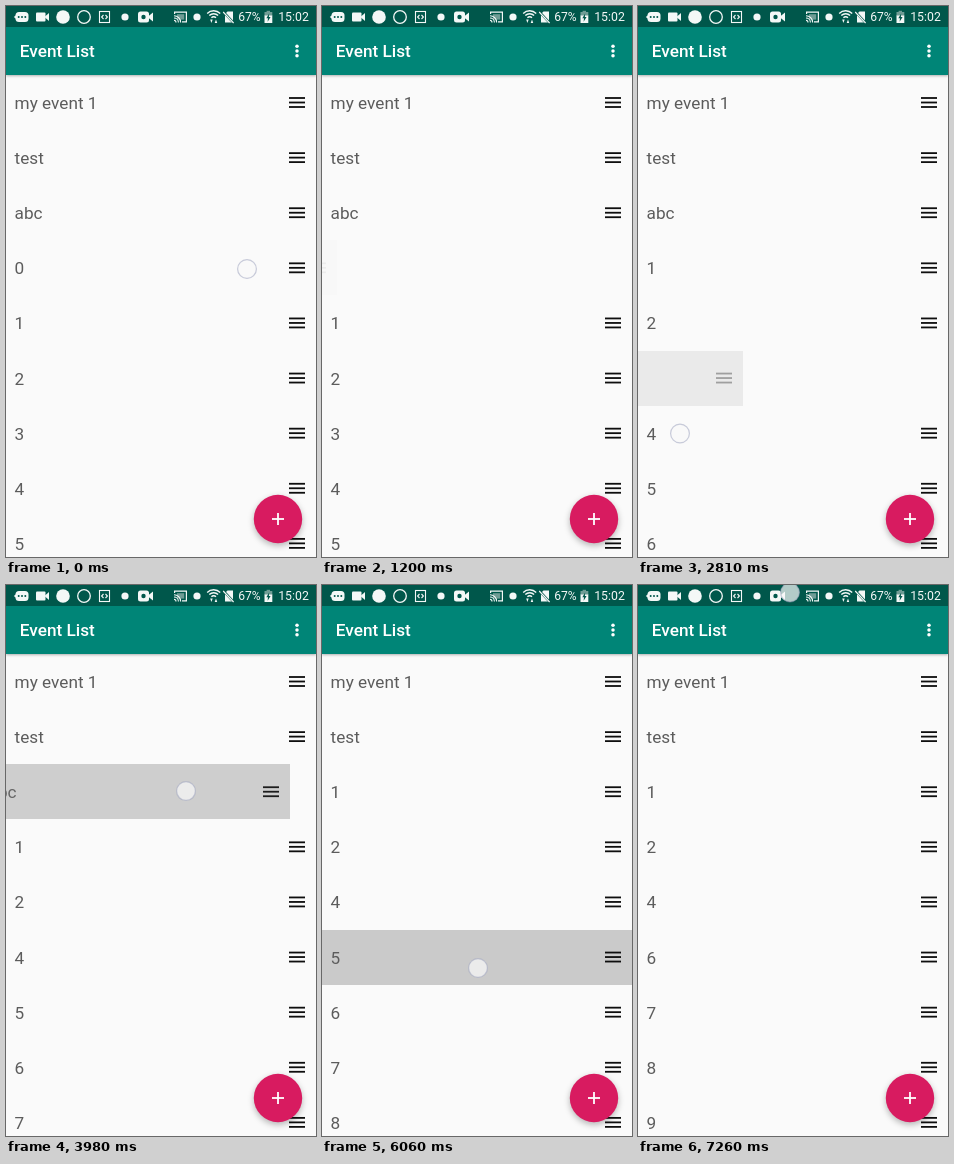
An HTML page with a canvas that plays this animation: 310 px wide and 551 px high, repeating every 8 s.

```html
<!DOCTYPE html>
<html>
<head>
<meta charset="utf-8">
<style>
html, body { margin: 0; width: 100%; height: 100%; overflow: hidden; background: #fafafa; }
canvas { display: block; width: 310px; height: 551px; }
</style>
</head>
<body>
<canvas id="stage"></canvas>
<script>
const W = 310, H = 551, LOOP = 8000, STEP = 100, ROW = 55.11, TOP = 69;
const canvas = document.getElementById('stage');
const ctx = canvas.getContext('2d');
const dpr = window.devicePixelRatio || 1;
canvas.width = W * dpr;
canvas.height = H * dpr;

const labels = ['my event 1', 'test', 'abc', ...Array.from({ length: 13 }, (_, i) => String(i))];

// touch: when the finger lands; drag: offsets per step; close: how far the gap has shut per step
const swipes = [
  { row: 3, touch: 0, start: 500, x: 241, y: 263, slip: 8, slope: .173,
    drag: [0, 14, 44, 81, 125, 180, 245, 295], lift: 6, shift: 1600, close: [.15, .7, 1] },
  { row: 5, touch: 1800, start: 2510, x: 247, y: 385.5, slip: 0, slope: .205,
    drag: [0, 45, 122, 205, 280], lift: 4, shift: 3210, close: [.15, .7, 1] },
  { row: 2, touch: 3410, start: 3880, x: 208, y: 211, slip: 2, slope: -.19,
    drag: [0, 26, 88, 170, 255], lift: 4, shift: 4580, close: [.1, .5, .95, 1] },
  { row: 5, touch: 4880, start: 6060, x: 156, y: 383, slip: 0, slope: .1,
    drag: [0, 10, 30, 60, 105, 165, 250], lift: 6, shift: 6960, close: [.1, .5, .95, 1] }
];
const LAST_TOUCH = 7260;

function rect(x, y, w, h, color) {
  ctx.fillStyle = color;
  ctx.fillRect(x, y, w, h);
}

function disc(x, y, r, color) {
  ctx.fillStyle = color;
  ctx.beginPath();
  ctx.arc(x, y, r, 0, Math.PI * 2);
  ctx.fill();
}

function arc(x, y, r, color, width, from = 0, to = Math.PI * 2) {
  ctx.strokeStyle = color;
  ctx.lineWidth = width;
  ctx.beginPath();
  ctx.arc(x, y, r, from, to);
  ctx.stroke();
}

function poly(points, color) {
  ctx.fillStyle = color;
  ctx.beginPath();
  points.forEach(([x, y]) => ctx.lineTo(x, y));
  ctx.fill();
}

function line(points, color, width) {
  ctx.strokeStyle = color;
  ctx.lineWidth = width;
  ctx.beginPath();
  points.forEach(([x, y]) => ctx.lineTo(x, y));
  ctx.stroke();
}

function box(x, y, w, h, r, color) {
  ctx.fillStyle = color;
  ctx.beginPath();
  ctx.roundRect(x, y, w, h, r);
  ctx.fill();
}

function text(str, x, y, size, color, weight = 400) {
  ctx.font = `${weight} ${size}px Roboto, sans-serif`;
  ctx.fillStyle = color;
  ctx.fillText(str, x, y);
}

function shadow(color, blur, dy) {
  ctx.shadowColor = color;
  ctx.shadowBlur = blur * dpr;
  ctx.shadowOffsetY = dy * dpr;
}

function drawRow(label, y, offset = null) {
  ctx.save();
  if (offset !== null) {
    ctx.translate(-offset, 0);
    ctx.globalAlpha = Math.max(0, 1 - offset / W);
    rect(0, Math.round(y), W, 55, '#cacaca');
  }
  text(label, 8.6, y + 34, 17.2, '#5c5c5c');
  for (const dy of [-4.5, 0, 4.5]) rect(283, y + 26.6 + dy, 16, 1.8, '#0e0e0e');
  ctx.restore();
}

function drawList(t) {
  const items = labels.slice();
  let gap = null;
  let held = null;
  for (const s of swipes) {
    if (t < s.start) break;
    const i = Math.floor((t - s.start) / STEP);
    if (i < s.drag.length) {
      held = { row: s.row, offset: s.drag[i] };
      gap = null;
      break;
    }
    items.splice(s.row, 1);
    const k = Math.floor((t - s.shift) / STEP);
    const closed = k < 0 ? 0 : s.close[Math.min(k, s.close.length - 1)];
    gap = { row: s.row, size: ROW * (1 - closed) };
  }
  items.forEach((label, i) => {
    const y = TOP + i * ROW + (gap && i >= gap.row ? gap.size : 0);
    if (y < H) drawRow(label, y, held && held.row === i ? held.offset : null);
  });
}

function drawFab() {
  ctx.save();
  shadow('rgba(0,0,0,.28)', 6, 2.5);
  disc(272, 513, 24.2, '#d81b60');
  ctx.restore();
  rect(266, 512.1, 12, 1.8, '#fff');
  rect(271.1, 507, 1.8, 12, '#fff');
}

function drawStatusIcons() {
  const white = '#f4f8f7', dark = '#00574b', dim = '#6f9c95';
  // message
  box(9.5, 6, 13, 10, 3.5, white);
  poly([[11, 8.5], [7.8, 11], [11, 13.5]], white);
  for (const x of [12.7, 16, 19.3]) disc(x, 11, 1, dark);
  // camcorder
  box(30, 6.5, 9.5, 9, 1, white);
  poly([[39, 10.5], [43, 7], [43, 15], [39, 11.5]], white);
  // app marks
  disc(57, 11, 6.8, white);
  arc(78, 11, 6.3, white, 1.3);
  // code box
  ctx.strokeStyle = white;
  ctx.lineWidth = 1.1;
  ctx.strokeRect(93.5, 5.5, 10, 11);
  line([[97.5, 9], [95.6, 11], [97.5, 13]], white, 1.1);
  line([[99.5, 9], [101.4, 11], [99.5, 13]], white, 1.1);
  disc(119, 11, 3.6, white);
  // recorder
  box(132, 5.5, 11, 11, 2.5, white);
  poly([[142, 10.5], [147, 6.5], [147, 15.5], [142, 11.5]], white);
  disc(137.5, 11, 2.2, dark);
  // cast
  line([[168.6, 8], [168.6, 6.2], [180.4, 6.2], [180.4, 15.8], [176, 15.8]], white, 1.2);
  rect(171, 8.2, 7.2, 5.4, dim);
  for (const r of [2, 4.4, 6.6]) arc(168, 16.4, r, white, 1.1, -Math.PI / 2, 0);
  disc(191, 11, 3.6, white);
  // wifi
  for (const r of [3.2, 6.2, 9.2]) arc(207.7, 14, r, white, 1.4, -Math.PI * .75, -Math.PI * .25);
  poly([[204.2, 13.5], [206.7, 13.5], [205.4, 17]], white);
  poly([[208.7, 17], [211.2, 17], [210, 13.5]], white);
  // no sim
  poly([[219, 8], [221.5, 5.5], [227, 5.5], [227, 16.5], [219, 16.5]], white);
  line([[217.8, 6.2], [228, 17.2]], dark, 2.4);
  line([[217.2, 6], [227.6, 17]], white, 1.1);
  text('67%', 232.2, 15.4, 12.1, white);
  // battery
  rect(260.6, 4.8, 3.4, 2, dim);
  rect(258.5, 6, 7.8, 4, dim);
  rect(258.5, 9.5, 7.8, 7.5, white);
  poly([[263.2, 7.5], [260.3, 12.3], [262, 12.3], [261.6, 15.8], [264.6, 11], [262.9, 11]], dark);
  text('15:02', 272.2, 15.4, 12.3, white);
}

function drawBars() {
  ctx.save();
  shadow('rgba(0,0,0,.3)', 2.5, .8);
  rect(0, 21, W, 48, '#008577');
  ctx.restore();
  rect(0, 0, W, 21, '#00574b');
  drawStatusIcons();
  text('Event List', 13.8, 51.4, 17.2, '#fff', 500);
  for (const y of [40.3, 45, 49.7]) disc(291, y, 1.75, '#fff');
}

function pointerAt(t) {
  if (t >= LAST_TOUCH) return [152, 7.5];
  for (const s of swipes) {
    if (t < s.touch) break;
    if (t < s.start) return [s.x, s.y];
    const i = Math.floor((t - s.start) / STEP);
    if (i < s.lift) {
      const d = s.drag[i];
      return [s.x - d - Math.min(d, s.slip), s.y + d * s.slope];
    }
  }
  return null;
}

function drawPointer(t) {
  const p = pointerAt(t);
  if (!p) return;
  disc(p[0], p[1], 9.5, 'rgba(248,248,248,.72)');
  arc(p[0], p[1], 9.4, 'rgba(150,156,185,.5)', 1.2);
}

function draw(t) {
  ctx.setTransform(dpr, 0, 0, dpr, 0, 0);
  rect(0, 0, W, H, '#fafafa');
  drawList(t);
  drawFab();
  drawBars();
  drawPointer(t);
}

const begin = performance.now();
function frame() {
  draw((performance.now() - begin) % LOOP);
  requestAnimationFrame(frame);
}
frame();
</script>
</body>
</html>
```
